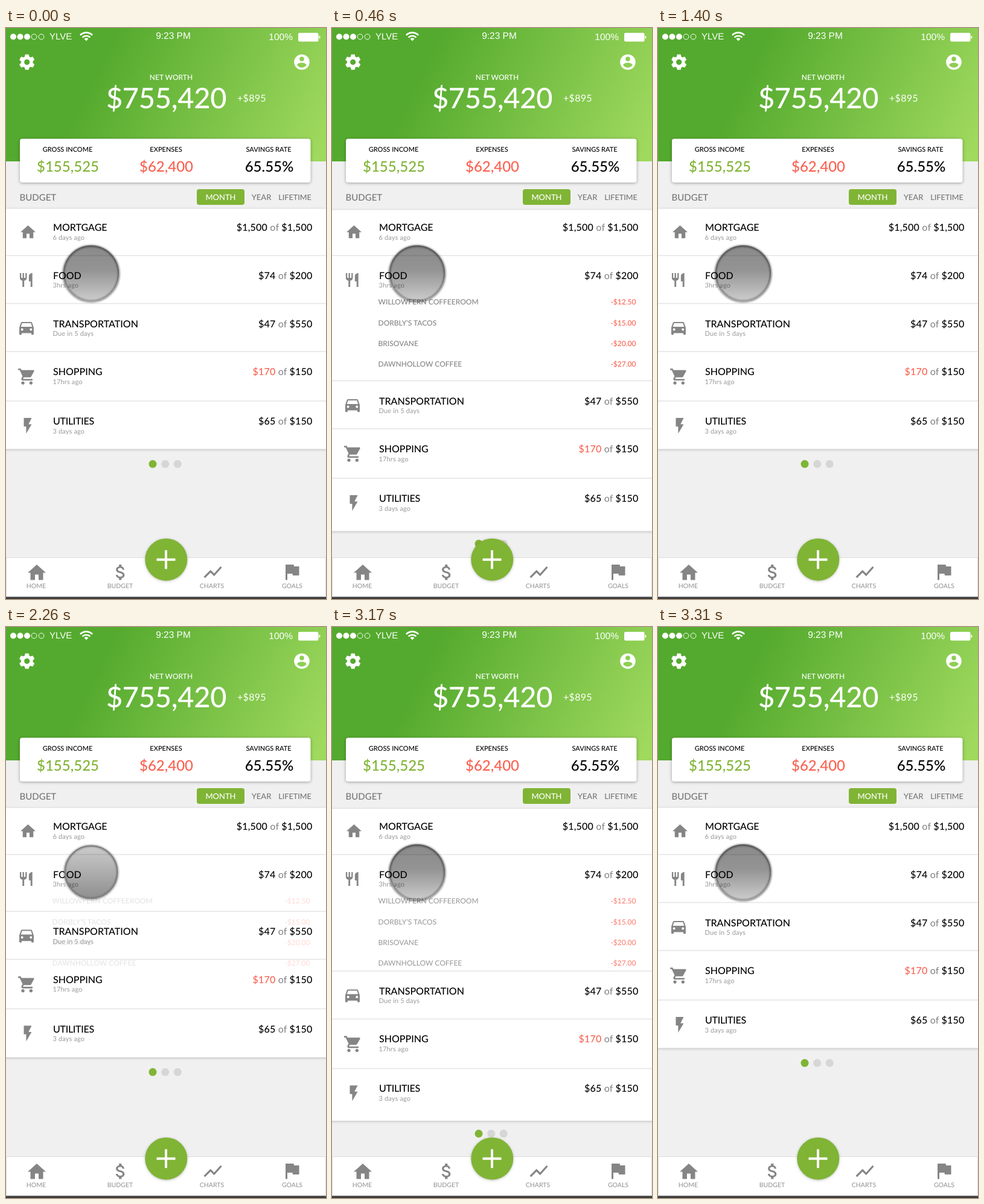
An HTML page for the animation above (3.35 s loop, 530 px wide and 946 px high).

```html
<!DOCTYPE html>
<html lang="en">
<head>
<meta charset="utf-8">
<title>Budget</title>
<style>
@property --u { syntax: "<number>"; inherits: true; initial-value: 0; }

html, body { margin: 0; height: 100%; overflow: hidden; background: #f0f0f0; }

svg {
  display: block; width: 100vw; height: 100vh;
  font-family: Lato, sans-serif; font-weight: 500; font-size: 16px;
  text-rendering: geometricPrecision;
  --p: calc(var(--u) * var(--u) * (3 - 2 * var(--u)));
  animation: unfold 3350ms infinite;
}

/* --u: how far the food row is open */
@keyframes unfold {
  0%      { --u: 0;   animation-timing-function: step-end; }
  10.149% { --u: .21; animation-timing-function: steps(4); }
  13.731% { --u: 1;   animation-timing-function: step-end; }
  37.611% { --u: .79; animation-timing-function: steps(5); }
  41.791% { --u: 0;   animation-timing-function: step-end; }
  67.462% { --u: .21; animation-timing-function: steps(6); }
  72.238% { --u: 1;   animation-timing-function: step-end; }
  94.626% { --u: .79; animation-timing-function: steps(7); }
  98.805% { --u: 0;   animation-timing-function: step-end; }
  100%    { --u: 0; }
}
@keyframes rest  { 0%, 69.05% { opacity: 1; } 67.462% { opacity: 0; } 100% { opacity: 1; } }
@keyframes press { 0%, 69.05% { opacity: 0; } 67.462% { opacity: 1; } 100% { opacity: 0; } }
.rest  { animation: rest 3350ms step-end infinite; }
.press { animation: press 3350ms step-end infinite; }

.list {
  y: calc(299.5px + 2px * var(--p));
  height: calc(398px + 134px * var(--p));
  fill: #fff; filter: drop-shadow(0 1px 2px rgba(0,0,0,.22));
}
.below { transform: translateY(calc(128px * var(--p))); }
.dots { transform: translateY(calc(132px * var(--p))); }
.items { opacity: var(--u); font-size: 12px; fill: #858585; }

.status { font: 15.5px "Liberation Sans", Arial, sans-serif; }
.white { fill: #fff; }
.light { font-weight: 400; }
.mid { text-anchor: middle; }
.end { text-anchor: end; }
.label { font-size: 11px; }
.value { font-size: 24px; }
.tab { font-size: 13px; fill: #777; }
.sub { font-size: 11px; letter-spacing: .15px; fill: #999; font-weight: 400; }
.sum { text-anchor: end; letter-spacing: .2px; }
.of { fill: #8a8a8a; }
.red { fill: #fa6150; }
.green { fill: #80b435; }
.icon { fill: #858585; }
.line { stroke: #e4e4e4; stroke-width: 1.4; }
.nav { font-size: 10.5px; fill: #999; text-anchor: middle; }
</style>
</head>
<body>
<svg viewBox="0 0 530 946" preserveAspectRatio="none">
  <defs>
    <linearGradient id="sky" gradientUnits="userSpaceOnUse" x1="150" y1="70" x2="500" y2="240">
      <stop offset="0" stop-color="#54aa2e"/><stop offset="1" stop-color="#9fd95e"/>
    </linearGradient>
    <linearGradient id="shade" x2="0" y2="1">
      <stop offset="0" stop-opacity=".46"/><stop offset=".45" stop-opacity=".42"/><stop offset="1" stop-opacity=".2"/>
    </linearGradient>
    <linearGradient id="shadePressed" x2="0" y2="1">
      <stop offset="0" stop-opacity=".2"/><stop offset="1" stop-opacity=".44"/>
    </linearGradient>
    <filter id="soft" x="-20%" y="-20%" width="140%" height="140%"><feGaussianBlur stdDeviation="1.8"/></filter>
    <path id="house" d="M10 20v-6h4v6h5v-8h3L12 3 2 12h3v8z"/>
    <path id="tooth" d="M-3.9-8.5L-2.9-12.8H2.9L3.9-8.5z"/>
  </defs>

  <rect width="530" height="946" fill="#f0f0f0"/>
  <rect width="530" height="221" fill="url(#sky)"/>

  <g class="white">
    <circle cx="12" cy="14.5" r="5"/><circle cx="23.5" cy="14.5" r="5"/><circle cx="35" cy="14.5" r="5"/>
    <g fill="none" stroke="#fff">
      <circle cx="46.5" cy="14.5" r="4.4"/><circle cx="58.5" cy="14.5" r="4.4"/>
      <path stroke-width="2.6" d="M122.9 11.8a14.3 14.3 0 0 1 20.2 0M126.6 15.6a9 9 0 0 1 12.8 0"/>
    </g>
    <path d="M133 21.4l-3.4-3.4a4.8 4.8 0 0 1 6.8 0z"/>
    <g class="status">
      <text x="72" y="19.3" font-size="15">YLVE</text>
      <text class="mid" x="277" y="18.3">9:23 PM</text>
      <text class="end" x="475" y="20">100%</text>
    </g>
    <rect x="484" y="8" width="33.5" height="14.5" rx="2.5"/>
    <path d="M518.5 12.5q2 .5 2 2.7t-2 2.8z"/>

    <g transform="translate(34.7 56.5)">
      <circle r="7.2" fill="none" stroke="#fff" stroke-width="5.2"/>
      <use href="#tooth"/><use href="#tooth" transform="rotate(60)"/><use href="#tooth" transform="rotate(120)"/>
      <use href="#tooth" transform="rotate(180)"/><use href="#tooth" transform="rotate(240)"/><use href="#tooth" transform="rotate(300)"/>
    </g>
    <path transform="translate(474.6 41.1) scale(1.28)" fill-rule="evenodd" d="M2 12a10 10 0 0 1 20 0a10 10 0 0 1-20 0zM9 8a3 3 0 0 0 6 0a3 3 0 0 0-6 0zM12 19.2c-2.5 0-4.71-1.28-6-3.22.03-1.99 4-3.08 6-3.08 1.99 0 5.97 1.09 6 3.08-1.29 1.94-3.5 3.22-6 3.22z"/>

    <text class="mid" x="273.5" y="86" font-size="12">NET WORTH</text>
    <text class="mid" x="265.5" y="133" font-size="47" letter-spacing="-.3">$755,420</text>
    <text class="light" x="383" y="122" letter-spacing=".3">+$895</text>
  </g>

  <rect x="23" y="183.5" width="481.5" height="72.5" rx="4" fill="#fff" style="filter:drop-shadow(0 1px 2.5px rgba(0,0,0,.35))"/>
  <g class="mid">
    <g class="label">
      <text x="102" y="205.3">GROSS INCOME</text><text x="265" y="205.3">EXPENSES</text><text x="435" y="205.3">SAVINGS RATE</text>
    </g>
    <g class="value">
      <text class="green" x="102.5" y="238">$155,525</text><text class="red" x="265.5" y="238">$62,400</text><text x="436" y="238">65.55%</text>
    </g>
  </g>

  <text x="22.5" y="286" font-size="15" fill="#777">BUDGET</text>
  <rect class="green" x="316" y="267" width="79" height="26" rx="4"/>
  <g class="tab mid">
    <text class="white" x="355.5" y="285">MONTH</text><text x="423" y="285">YEAR</text><text x="478.5" y="285" font-size="12.6">LIFETIME</text>
  </g>

  <rect class="list" x="-6" width="542"/>
  <path class="line" d="M0 377H530"/>

  <use class="icon" href="#house" transform="translate(21.5 323.2) scale(1.25)"/>
  <text x="78" y="336.3">MORTGAGE</text><text class="sub" x="77.5" y="350.5">6 days ago</text>
  <text class="sum" x="507.5" y="336.3">$1,500 <tspan class="of">of</tspan> $1,500</text>

  <path class="icon" transform="translate(19.5 403.7) scale(1.15)" d="M11 9H9V2H7v7H5V2H3v7c0 2.12 1.66 3.84 3.75 3.97V22h2.5v-9.03C11.34 12.84 13 11.12 13 9V2h-2v7zm5-3v8h2.5v8H21V2c-2.76 0-5 2.24-5 4z"/>
  <text x="78" y="416">FOOD</text><text class="sub" x="77.5" y="430.3">3hrs ago</text>
  <text class="sum" x="507.5" y="416">$74 <tspan class="of">of</tspan> $200</text>

  <g class="items">
    <text x="76.5" y="458.3">WILLOWFERN COFFEEROOM</text>
    <text x="76.5" y="492.8">DORBLY’S TACOS</text>
    <text x="76.5" y="527.3">BRISOVANE</text>
    <text x="76.5" y="560.8">DAWNHOLLOW COFFEE</text>
    <g class="red end">
      <text x="503.5" y="458.3">-$12.50</text><text x="503.5" y="492.8">-$15.00</text><text x="503.5" y="527.3">-$20.00</text><text x="503.5" y="560.8">-$27.00</text>
    </g>
  </g>

  <g class="below">
    <path class="line" d="M0 456.5H530M0 536H530M0 618H530"/>

    <path class="icon" transform="translate(18 480.3) scale(1.33)" d="M18.92 6.01C18.72 5.42 18.16 5 17.5 5h-11c-.66 0-1.21.42-1.42 1.01L3 12v8q0 1 1 1h1q1 0 1-1v-1h12v1q0 1 1 1h1q1 0 1-1v-8zM5 14.5a1.5 1.5 0 0 0 3 0a1.5 1.5 0 0 0-3 0zM16 14.5a1.5 1.5 0 0 0 3 0a1.5 1.5 0 0 0-3 0zM5 11l1.5-4.5h11L19 11z" fill-rule="evenodd"/>
    <text x="78" y="495.5">TRANSPORTATION</text><text class="sub" x="77.5" y="510">Due in 5 days</text>
    <text class="sum" x="507.5" y="495.5">$47 <tspan class="of">of</tspan> $550</text>

    <g class="icon" transform="translate(18.7 561.5) scale(1.33)">
      <path d="M1 2v2h2l3.6 7.59-1.35 2.45c-.16.28-.25.61-.25.96 0 1.1.9 2 2 2h12v-2H7.42c-.14 0-.25-.11-.25-.25l.03-.12.9-1.63h7.45c.75 0 1.41-.41 1.75-1.03l3.58-6.49c.4-.7 0-1.48-.88-1.48H5.21l-.94-2z"/>
      <circle cx="7" cy="20" r="2"/><circle cx="17" cy="20" r="2"/>
    </g>
    <text x="78" y="575">SHOPPING</text><text class="sub" x="77.5" y="589.5">17hrs ago</text>
    <text class="sum" x="507.5" y="575"><tspan class="red">$170</tspan> <tspan class="of">of</tspan> $150</text>

    <path class="icon" transform="translate(20.4 643.4) scale(1.3)" d="M7 2v11h3v9l7-12h-4l4-8z"/>
    <text x="78" y="657" letter-spacing="-.3">UTILITIES</text><text class="sub" x="77.5" y="671.5">3 days ago</text>
    <text class="sum" x="507.5" y="657">$65 <tspan class="of">of</tspan> $150</text>
  </g>

  <g class="dots" fill="#d6d6d6">
    <circle class="green" cx="243" cy="722.3" r="6.5"/><circle cx="263.7" cy="722.3" r="6.5"/><circle cx="284.2" cy="722.3" r="6.5"/>
  </g>

  <g class="rest">
    <circle cx="141" cy="407" r="46" fill="none" stroke="#000" stroke-opacity=".5" stroke-width="3" filter="url(#soft)"/>
    <circle cx="141" cy="406" r="46" fill="url(#shade)"/>
  </g>
  <g class="press">
    <circle cx="141" cy="406.5" r="44" fill="none" stroke="#000" stroke-opacity=".4" stroke-width="3" filter="url(#soft)"/>
    <circle cx="141" cy="406" r="43.5" fill="url(#shadePressed)" stroke="#808080" stroke-width="2"/>
  </g>

  <rect x=".5" y="877.5" width="529" height="64.5" fill="#fff" stroke="#dcdcdc"/>
  <rect y="942.5" width="530" height="3.5" fill="#3c3c3c"/>
  <g class="icon">
    <use href="#house" transform="translate(33 884.5) scale(1.5)"/>
    <path transform="translate(172.9 884.7) scale(1.42)" d="M11.8 10.9c-2.27-.59-3-1.2-3-2.15 0-1.09 1.01-1.85 2.7-1.85 1.78 0 2.44.85 2.5 2.1h2.21c-.07-1.72-1.12-3.3-3.21-3.81V3h-3v2.16c-1.94.42-3.5 1.68-3.5 3.61 0 2.31 1.91 3.46 4.7 4.13 2.5.6 3 1.48 3 2.41 0 .69-.49 1.79-2.7 1.79-2.06 0-2.87-.92-2.98-2.1h-2.2c.12 2.19 1.76 3.42 3.68 3.83V21h3v-2.15c1.95-.37 3.5-1.5 3.5-3.55 0-2.84-2.43-3.81-4.7-4.4z"/>
    <path transform="translate(324.5 883.5) scale(1.5)" d="M3.5 18.49l6-6.01 4 4L22 6.92l-1.41-1.41-7.09 7.97-4-4L2 16.99z"/>
    <path transform="translate(455.5 883) scale(1.5)" d="M14.4 6L14 4H5v17h2v-7h5.6l.4 2h7V6z"/>
  </g>
  <g class="nav">
    <text x="50" y="927.7">HOME</text><text x="189" y="927.7">BUDGET</text><text x="341" y="927.7">CHARTS</text><text x="474" y="927.7">GOALS</text>
  </g>

  <circle class="green" cx="265.3" cy="880.7" r="35" style="filter:drop-shadow(0 1px 2px rgba(0,0,0,.25))"/>
  <path d="M249.5 880.7h31M265 865.2v31" stroke="#fff" stroke-width="4"/>
</svg>
</body>
</html>
```
